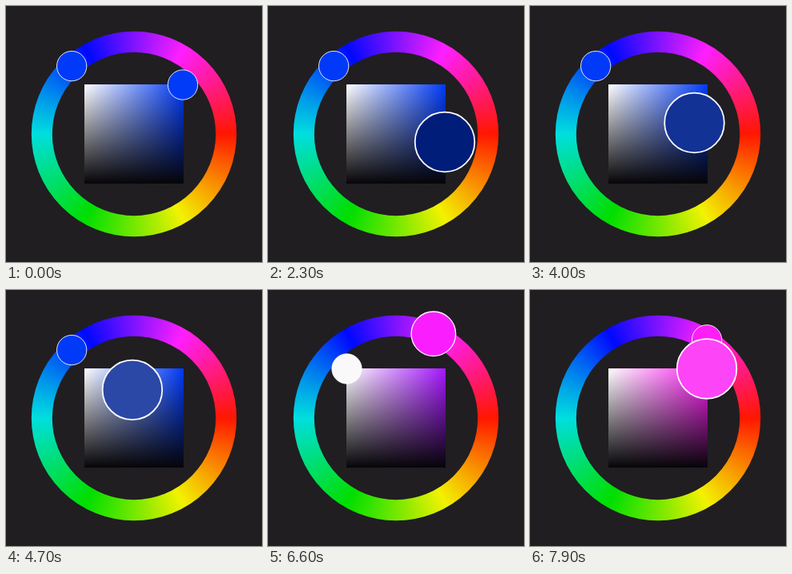
These frames come from a looping animation (320x320 px, 8000 ms). An HTML page with a canvas:

```html
<!DOCTYPE html>
<html lang="en">
<head>
<meta charset="utf-8">
<title>Colour wheel</title>
<style>
  html, body { margin: 0; width: 100%; height: 100%; overflow: hidden; background: #201e21; }
  canvas { display: block; width: 320px; height: 320px; }
</style>
</head>
<body>
<canvas></canvas>
<script>
const LOOP = 8000;
const CENTER = 160, RING_MID = 115.2, RING_WIDTH = 26;
const LEFT = 98, SIZE = 124;
const HANDLE = 19.1;
const LAG = 145;   // delay of the picked colours behind the pointer
const LEAD = 70;   // the hue colour runs slightly ahead of its handle

const canvas = document.querySelector('canvas');
const ctx = canvas.getContext('2d');
const density = Math.max(1, window.devicePixelRatio || 1);
canvas.width = canvas.height = 320 * density;
ctx.scale(density, density);

const clamp = k => Math.min(1, Math.max(0, k));
const mix = (a, b, k) => a + (b - a) * k;
const css = rgb => `rgb(${rgb.map(Math.round).join(',')})`;

// Smooth step from 0 to 1 between two times
function ramp(t, from, to) {
  const k = clamp((t - from) / (to - from));
  return k * k * (3 - 2 * k);
}

const hueAt = t => 227.5 + 74.5 * ramp(t, 5900, 6780);
const hueScale = t => 1 + 0.53 * (ramp(t, 5850, 6250) - ramp(t, 6560, 6800));

const pickX = t => 221 - 15.5 * ramp(t, 2900, 4000)
  - 107 * ramp(t, 4400, 5050) + 122.5 * ramp(t, 7400, 7880);
const pickY = t => 98.5 + 71.5 * ramp(t, 1650, 2300)
  - 24 * ramp(t, 2900, 4000) - 47.5 * ramp(t, 4400, 5050);
const pickScale = t => 1 + ramp(t, 1450, 1700)
  - ramp(t, 5200, 5400) + ramp(t, 7200, 7450);

// Pure hue, with softened greens and a slight lift in reds and blues
function hueColor(deg) {
  const [r, g, b] = [0, 120, 240].map(peak => {
    const gap = Math.abs((deg - peak + 540) % 360 - 180);
    return clamp(2 - gap / 60);
  });
  const level = 255 * (1 - 0.05 * g - 0.08 * g * (1 - r));
  return [r, mix(g, 1, 0.09 * r + 0.03 * b), b].map(c => Math.min(1, c) * level);
}

function pickColor(t) {
  const tint = hueColor(hueAt(t));
  const s = clamp((pickX(t) - LEFT) / SIZE);
  const v = 1 - (pickY(t) - LEFT) / SIZE;
  return tint.map(c => mix(251, c, s) * v);
}

const ring = ctx.createConicGradient(0, CENTER, CENTER);
for (let deg = 0; deg <= 360; deg += 20) ring.addColorStop(deg / 360, css(hueColor(deg)));

function drawRing() {
  ctx.beginPath();
  ctx.arc(CENTER, CENTER, RING_MID, 0, Math.PI * 2);
  ctx.lineWidth = RING_WIDTH;
  ctx.strokeStyle = ring;
  ctx.stroke();
}

function drawSquare(hue) {
  const end = LEFT + SIZE;
  const tint = ctx.createLinearGradient(LEFT, 0, end, 0);
  tint.addColorStop(0, '#fff');
  tint.addColorStop(1, css(hueColor(hue)));
  const shade = ctx.createLinearGradient(0, LEFT, 0, end);
  shade.addColorStop(0, 'rgba(6,5,8,0)');
  shade.addColorStop(1, 'rgb(6,5,8)');
  for (const fill of [tint, shade]) {
    ctx.fillStyle = fill;
    ctx.fillRect(LEFT, LEFT, SIZE, SIZE);
  }
}

function drawHandle(x, y, scale, color) {
  const line = 0.9 * scale;
  ctx.beginPath();
  ctx.arc(x, y, HANDLE * scale - line / 2, 0, Math.PI * 2);
  ctx.fillStyle = css(color);
  ctx.fill();
  ctx.lineWidth = line;
  ctx.strokeStyle = '#fafafd';
  ctx.stroke();
}

function draw(t) {
  ctx.fillStyle = '#201e21';
  ctx.fillRect(0, 0, 320, 320);
  drawRing();
  drawSquare(hueAt(t - LAG));

  const angle = hueAt(t) * Math.PI / 180;
  drawHandle(
    CENTER + RING_MID * Math.cos(angle), CENTER + RING_MID * Math.sin(angle),
    hueScale(t), hueColor(hueAt(t + LEAD))
  );
  drawHandle(pickX(t), pickY(t), pickScale(t), pickColor(t - LAG));
}

const start = performance.now();
function tick() {
  draw((performance.now() - start) % LOOP);
  requestAnimationFrame(tick);
}
tick();
</script>
</body>
</html>
```
